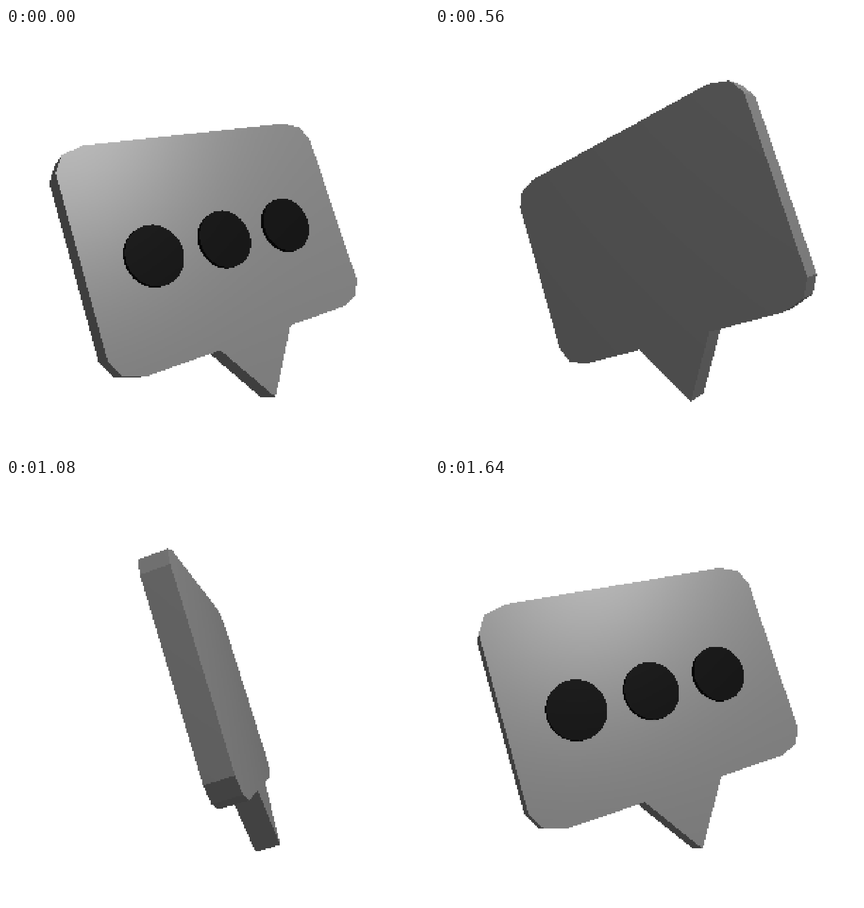
An HTML page with a canvas for the animation above (1.68 s loop, 748 px wide and 748 px high).

```html
<!DOCTYPE html>
<html lang="en">
<head>
<meta charset="utf-8">
<title>Turning speech bubble</title>
<style>
html, body { margin: 0; width: 100%; height: 100%; overflow: hidden; background: #fff; }
canvas { display: block; width: 748px; height: 748px; image-rendering: pixelated; }
</style>
</head>
<body>
<canvas id="stage" width="300" height="300"></canvas>
<script>
const SIZE = 300, PX = 748 / SIZE;
const STEP = 40, STEPS = 42;
const DIST = 1000, CX = 375.4, CY = 368.3;
const RAD = Math.PI / 180;
const cr = Math.cos(17.2 * RAD), sr = Math.sin(17.2 * RAD);
const cp = Math.cos(7 * RAD), sp = Math.sin(7 * RAD);
const LAMP = [1010, -976, 965];
const CARD = { ambient: 62, diffuse: 80, gloss: 54 };
const DOT = { ambient: 6, diffuse: 20, gloss: 15 };
const BACK = -21.5, FRONT = 22.5, DOT_R = 50.5, DOT_Y = 11.5;
const DOT_XS = [-142, -6, 130];

const ctx = document.getElementById('stage').getContext('2d');
const image = ctx.createImageData(SIZE, SIZE);
const pixels = new Uint32Array(image.data.buffer);
const depth = new Float32Array(SIZE * SIZE);

const dot = (a, b) => a[0] * b[0] + a[1] * b[1] + a[2] * b[2];
const clamp = (v, lo, hi) => Math.min(hi, Math.max(lo, v));
const unit = v => {
  const len = Math.hypot(...v);
  return v.map(c => c / len);
};

// Outlines run clockwise on screen, y pointing down.
function prism(outline, z0, z1, ink, shaded) {
  const at = z => outline.map(([x, y]) => [x, y, z]);
  const faces = [
    { pts: at(z1), n: [0, 0, 1], ink, shaded },
    { pts: at(z0), n: [0, 0, -1], ink }
  ];
  outline.forEach(([x, y], i) => {
    const [x2, y2] = outline[(i + 1) % outline.length];
    faces.push({
      pts: [[x, y, z0], [x2, y2, z0], [x2, y2, z1], [x, y, z1]],
      n: unit([y2 - y, x - x2, 0]),
      ink
    });
  });
  return faces;
}

function cardOutline() {
  const q = [[207, 186.5], [243.5, 174.5], [259.5, 147]];
  const r = [...q].reverse();
  const flip = (list, fx, fy) => list.map(([x, y]) => [x * fx, y * fy]);
  return [...flip(q, 1, -1), ...r, ...flip(q, -1, 1), ...flip(r, -1, -1)];
}

function disc(cx) {
  return Array.from({ length: 32 }, (_, i) => {
    const a = i / 32 * 2 * Math.PI;
    return [cx + DOT_R * Math.cos(a), DOT_Y + DOT_R * Math.sin(a)];
  });
}

const model = [
  ...prism(cardOutline(), BACK, FRONT, CARD, true),
  ...prism([[79, 180], [0, 290], [-79, 180]], BACK, FRONT, CARD),
  ...DOT_XS.flatMap(x => prism(disc(x), FRONT, FRONT + 8.5, DOT))
];

function turner(angle) {
  const c = Math.cos(angle), s = Math.sin(angle);
  return ([x, y, z]) => {
    const d = z * c - x * s;
    return [x * c + z * s, y * cp - d * sp, d * cp + y * sp];
  };
}

function project([x, y, z]) {
  const k = DIST / (DIST - z), u = x * k, v = y * k;
  return [(CX + u * cr + v * sr) / PX, (CY - u * sr + v * cr) / PX];
}

// Soft shade that the dots throw across the front of the card.
function shadowCaster(turn) {
  const light = unit(LAMP), ex = turn([1, 0, 0]), ey = turn([0, 1, 0]);
  const lz = dot(light, turn([0, 0, 1]));
  if (lz <= 0.02) return () => 0;
  const lx = dot(light, ex), ly = dot(light, ey), flat = Math.hypot(lx, ly);
  const dx = lx / flat, dy = ly / flat;
  const reach = Math.min(150, 6 * (flat / lz) ** 2);
  return p => {
    const x = dot(p, ex), y = dot(p, ey);
    let dark = 0;
    for (const cx of DOT_XS) {
      const gx = cx - x, gy = DOT_Y - y;
      const along = clamp(gx * dx + gy * dy, 0, reach);
      const gap = Math.hypot(gx - along * dx, gy - along * dy);
      const fade = 1 - 0.7 * along / (reach + 1);
      dark = Math.max(dark, clamp((DOT_R - gap) / 16, 0, 1) * fade);
    }
    return dark * 0.8;
  };
}

function shade(p, n, ink, dark) {
  const light = unit(LAMP.map((c, i) => c - p[i]));
  const diff = dot(n, light);
  if (diff <= 0) return ink.ambient;
  const view = unit([-p[0], -p[1], DIST - p[2]]);
  const half = unit(view.map((c, i) => c + light[i]));
  const gloss = Math.max(0, dot(n, half)) ** 42;
  return ink.ambient + (1 - dark) * (ink.diffuse * diff + ink.gloss * gloss);
}

function fillFace(face, turn, shadow) {
  const pts = face.pts.map(turn), n = turn(face.n), a = pts[0];
  const plane = dot(n, [a[0], a[1], a[2] - DIST]);
  if (plane >= 0) return;
  const flat = pts.map(project);
  const xs = flat.map(p => p[0]), ys = flat.map(p => p[1]);
  const x0 = Math.max(0, Math.floor(Math.min(...xs)));
  const x1 = Math.min(SIZE - 1, Math.ceil(Math.max(...xs)));
  const y0 = Math.max(0, Math.floor(Math.min(...ys)));
  const y1 = Math.min(SIZE - 1, Math.ceil(Math.max(...ys)));

  for (let y = y0; y <= y1; y++) {
    for (let x = x0; x <= x1; x++) {
      const px = x + 0.5, py = y + 0.5;
      let pos = false, neg = false;
      for (let i = 0, j = flat.length - 1; i < flat.length; j = i++) {
        const [ax, ay] = flat[j], [bx, by] = flat[i];
        const side = (bx - ax) * (py - ay) - (by - ay) * (px - ax);
        if (side > 0) pos = true;
        else if (side < 0) neg = true;
        if (pos && neg) break;
      }
      if (pos && neg) continue;

      const sx = px * PX - CX, sy = py * PX - CY;
      const u = sx * cr - sy * sr, v = sx * sr + sy * cr;
      const t = plane / (n[0] * u + n[1] * v - n[2] * DIST);
      const at = y * SIZE + x;
      if (t <= 0 || t >= depth[at]) continue;
      depth[at] = t;
      const p = [u * t, v * t, DIST - t * DIST];
      const g = clamp(Math.round(shade(p, n, face.ink, face.shaded ? shadow(p) : 0)), 0, 255);
      pixels[at] = (0xff000000 | g << 16 | g << 8 | g) >>> 0;
    }
  }
}

// A steady turn with a slight sway that repeats every half turn.
function angleAt(step) {
  const turned = step / STEPS * 360, w = 2 * turned * RAD;
  const sway = -1.6 + 3.2 * Math.cos(w) + 1.5 * Math.sin(w)
    - 0.8 * Math.cos(2 * w) - 0.4 * Math.sin(2 * w);
  return (31 + turned + sway) * RAD;
}

function draw(step) {
  pixels.fill(0xffffffff);
  depth.fill(Infinity);
  const turn = turner(angleAt(step));
  const shadow = shadowCaster(turn);
  for (const face of model) fillFace(face, turn, shadow);
  ctx.putImageData(image, 0, 0);
}

let shown = -1, start = null;
function tick() {
  const now = performance.now();
  if (start === null) start = now;
  const step = Math.floor((now - start) / STEP) % STEPS;
  if (step !== shown) draw(shown = step);
  requestAnimationFrame(tick);
}
tick();
</script>
</body>
</html>
```
